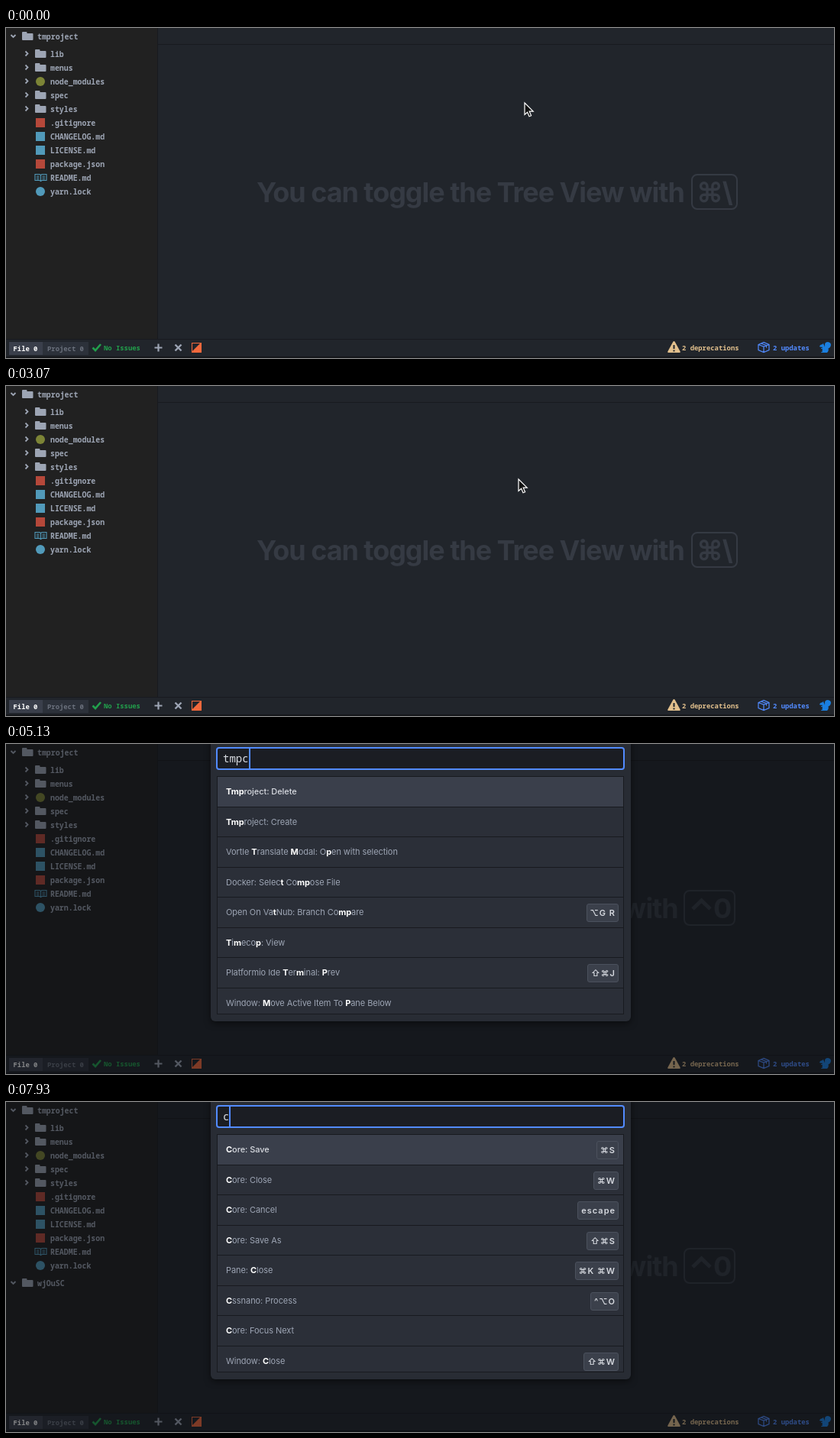
Write an HTML page that moves like this. It is 1084x432 px and loops after 8 s.

```html
<!DOCTYPE html>
<html lang="en">
<head>
<meta charset="utf-8">
<title>Command palette</title>
<style>
html, body { margin: 0; width: 100%; height: 100%; overflow: hidden; background: #21252b; }
#stage { position: relative; width: 1084px; height: 432px; overflow: hidden; }
svg { position: absolute; left: 0; top: 0; }
text { white-space: pre; }
.mono { font: 700 9.9px "Noto Sans Mono", monospace; fill: #9da5b4; }
.small { font-size: 8.9px; }
.tip { font: 700 36px Inter, "DejaVu Sans", sans-serif; letter-spacing: -1.05px; fill: #353a43; }
.tip rect { fill: none; stroke: #353a43; stroke-width: 2; }
#shade { position: absolute; inset: 0; background: rgba(11, 13, 16, .5); }
#palette { position: absolute; left: 268px; top: -10px; width: 550px; height: 373px; border-radius: 6px;
  background: #282c34; box-shadow: 0 3px 8px rgba(0, 0, 0, .5); font: 11px Inter, "DejaVu Sans", sans-serif; letter-spacing: -.06px; color: #9da5b4; }
#query { position: absolute; left: 7px; top: 14px; width: 524px; height: 26px; padding-left: 7px; border: 2px solid #528bff;
  border-radius: 4px; background: #1b1d23; color: #d7dae0; font: 14px/26px "Noto Sans Mono", monospace; letter-spacing: 0; white-space: pre; display: flex; }
#query i { width: 2px; height: 26px; background: #528bff; }
#list { position: absolute; left: 8px; top: 52px; width: 531px; height: 310px; overflow: hidden; border: 1px solid #181a1f; }
.row { position: relative; height: 38.5px; border-bottom: 1px solid #181a1f; padding-left: 11px; line-height: 38px; background: #2b2f38; white-space: pre; }
.row:first-child { background: #3a3f4b; color: #d7dae0; font-weight: 500; }
.row b { color: #fff; }
kbd { position: absolute; right: 6px; top: 8px; height: 22px; padding: 0 3px 0 4px; border: 1px solid #4b515d; border-radius: 3px;
  background: #3b404b; color: #d7dae0; font: 600 11px/22px Inter, "DejaVu Sans", sans-serif; letter-spacing: 1px; }
</style>
</head>
<body>
<div id="stage">
  <svg id="editor" width="1084" height="432"></svg>
  <div id="shade"></div>
  <div id="palette"><div id="query"><span></span><i></i></div><div id="list"></div></div>
  <svg width="1084" height="432"><path id="mouse" d="M0 0V15.5L3.6 12.2 6 17.8 8.6 16.7 6.2 11.2H11.2Z" fill="#111" stroke="#fff" stroke-width="1.2"/></svg>
</div>
<script>
const $ = id => document.getElementById(id);
const GREY = '#9da5b4', BLUE = '#519aba', RED = '#b5483a', TIP = '#353a43';

const rect = (x, y, w, h, fill) => `<rect x="${x}" y="${y}" width="${w}" height="${h}" fill="${fill}"/>`;
const line = (d, color, width) => `<path d="${d}" fill="none" stroke="${color}" stroke-width="${width}"/>`;
const shape = (d, color) => `<path d="${d}" fill="${color}"/>`;
const text = (x, y, s, cls = 'mono', color = '') => `<text x="${x}" y="${y}" class="${cls}" style="fill:${color}">${s}</text>`;

// Tree icons, placed by left edge and row centre
const icons = {
  folder: (x, y) => shape(`M${x} ${y - 5}q0-1 1-1h4.500q1 0 1 1v1h7q1 0 1 1v7q0 1-1 1h-12.500q-1 0-1-1z`, GREY),
  dot: color => (x, y) => `<circle cx="${x + 7}" cy="${y}" r="6" fill="${color}"/>`,
  square: color => (x, y) => rect(x + 1, y - 6, 12, 12, color),
  book: (x, y) => line(`M${x} ${y - 4.5}h6l1.500 1 1.500-1h6v8h-6l-1.500 1-1.500-1h-6zM${x + 7.5} ${y - 3.5}v8`, BLUE, 1.1) +
    line(`M${x + 2} ${y - 2}h3.500m4 0h3.500M${x + 2} ${y}h3.500m4 0h3.500M${x + 2} ${y + 2}h3.500m4 0h3.500`, BLUE, .9)
};

const root = (y, name) => line(`M6.500 ${y - 2}l3 3 3-3`, GREY, 1.8) + icons.folder(21, y) + text(41, y + 4, name);

const tree = [
  ['lib', icons.folder, 1], ['menus', icons.folder, 1], ['node_modules', icons.dot('#7c8436'), 1],
  ['spec', icons.folder, 1], ['styles', icons.folder, 1], ['.gitignore', icons.square(RED)],
  ['CHANGELOG.md', icons.square(BLUE)], ['LICENSE.md', icons.square(BLUE)], ['package.json', icons.square(RED)],
  ['README.md', icons.book], ['yarn.lock', icons.dot(BLUE)]
].map(([name, icon, open], i) => {
  const y = 34 + 18 * i;
  return (open ? line(`M25.500 ${y - 3.5}l3 3-3 3`, GREY, 1.8) : '') + icon(38, y) + text(58, y + 4, name);
}).join('');

const status =
  rect(0, 407, 1084, 25, '#21252b') + rect(0, 407, 1084, 1, '#181a1f') + rect(0, 430, 1084, 2, '#15171b') +
  rect(4, 411, 44, 17, '#3a3f4b') + rect(48, 411, 60, 17, '#2c313a') +
  text(9.5, 423, 'File 0', 'mono small', '#fff') + text(54, 423, 'Project 0', 'mono small', '#6b717d') +
  line('M113.500 418.500l3.500 3.500 7-8', '#22a04c', 2.6) + text(128, 422, 'No Issues', 'mono small', '#22a04c') +
  line('M194.500 418.500h10m-5-5v10', GREY, 2.2) + line('M221.500 414.500l8 8m0-8l-8 8', GREY, 2.4) +
  rect(243, 412, 13, 13, '#f2683c') + shape('M244 413h10l-10 10z', '#21252b') +
  shape('M874.500 410q.8 0 1.200.8l7 12.700q.5 1.500-1 1.500h-14.400q-1.500 0-1-1.500l7-12.700q.4-.8 1.200-.8z', '#e2c08d') +
  line('M874.500 415v5m0 1.500v2', '#21252b', 2) + text(885, 422, '2 deprecations', 'mono small', '#e2c08d') +
  line('M985 414.500l7-3 7 3v7l-7 3-7-3zl7 2.500 7-2.500M992 417v7.500M988.500 413l7 2.500v3', '#528bff', 1.2) +
  text(1004, 422, '2 updates', 'mono small', '#528bff') +
  shape('M1065 416.500q1-2.500 4-2.500l1-1.500.5 2q1.500 1 1 3 1-1 .5-3 0-3.500 4-3.500 4 .5 4 4-.5 3.500-3.500 4.500 1 3-1.500 5.500h-8q0-1.500 2-1.500-1-2 0-3.500h-2v-1h1.500q.5-.8 0-1.200-3.500.2-3.500-1.300z', '#1a7fe0');

const tip = (id, x, s, boxX, boxW, keys) =>
  `<g id="${id}" class="tip">${text(x, 228, s, '')}<rect x="${boxX}" y="192" width="${boxW}" height="45" rx="7"/>${keys}</g>`;

$('editor').innerHTML =
  rect(0, 0, 1084, 432, '#21252b') + rect(0, 0, 198, 407, '#212121') + rect(198, 0, 1, 407, '#181a1f') +
  rect(199, 21, 885, 1, '#181a1f') + root(11, 'tmproject') + tree + `<g id="added">${root(237, 'wjOuSC')}</g>` +
  tip('tipA', 328, 'You can toggle the Tree View with', 898, 59, text(904, 228, '⌘\\', '')) +
  tip('tipB', 331, 'You can focus the Tree View with', 888, 66,
    line('M899 216l11.500-11 11.500 11', TIP, 5) + text(926, 228, '0', '')) + status;

// Asterisks mark matched letters; text after | is the shortcut
const lists = {
  all: ['About: View Release Notes', 'Application: About', 'Application: Add Project Folder|⇧⌘O',
    'Application: Bring All Windows To Front', 'Application: Hide|⌘H', 'Application: Hide Other Applications|⌥⌘H',
    'Application: Install Update', 'Application: Minimize|⌘M'],
  tmp: ['*Tmp*roject: Delete', '*Tmp*roject: Create', 'Vortle *T*ranslate *M*odal: O*p*en with selection',
    'Docker: Selec*t* Co*mp*ose File', 'Open On Va*t*Nub: Branch Co*mp*are|⌥G R', '*T*i*m*eco*p*: View',
    'Platformio Ide *T*er*m*inal: *P*rev|⇧⌘J', 'Window: *M*ove Active Item To *P*ane Below'],
  c: ['*C*ore: Save|⌘S', '*C*ore: Close|⌘W', '*C*ore: Cancel|escape', '*C*ore: Save As|⇧⌘S', 'Pane: *C*lose|⌘K ⌘W',
    '*C*ssnano: Process|^⌥O', '*C*ore: Focus Next', 'Window: *C*lose|⇧⌘W']
};

const row = item => {
  const [label, keys] = item.split('|');
  return `<div class="row">${label.replace(/\*(.+?)\*/g, '<b>$1</b>')}${keys ? `<kbd>${keys}</kbd>` : ''}</div>`;
};

// [time, query, list]; a null query closes the palette
const steps = [[0, null], [3600, '', 'all'], [4600, 't', 'all'], [4730, 'tm', 'all'], [4870, 'tmp', 'all'],
  [4930, 'tmp', 'tmp'], [5130, 'tmpc', 'tmp'], [5600, null], [7530, '', 'all'], [7870, 'c', 'all'], [7925, 'c', 'c']];

const clamp = v => Math.max(0, Math.min(1, v));
const show = (id, on) => $(id).style.display = on ? '' : 'none';
let shown;

function frame(now) {
  const t = now % 8000;
  const [, query, list] = steps.findLast(s => s[0] <= t);
  const open = query != null;
  show('shade', open);
  show('palette', open);
  if (open) {
    $('query').firstChild.textContent = query;
    if (list !== shown) $('list').innerHTML = lists[shown = list].map(row).join('');
  }
  show('added', t >= 5900);
  $('tipA').style.opacity = clamp((4500 - t) / 300);
  $('tipB').style.opacity = clamp((t - 4500) / 300);

  const p = clamp(t / 700), e = p * p * (3 - 2 * p);
  show('mouse', t < 4600);
  $('mouse').setAttribute('transform', `translate(${679 - 8 * e} ${98 + 24 * e})`);
  requestAnimationFrame(frame);
}
requestAnimationFrame(frame);
</script>
</body>
</html>
```
